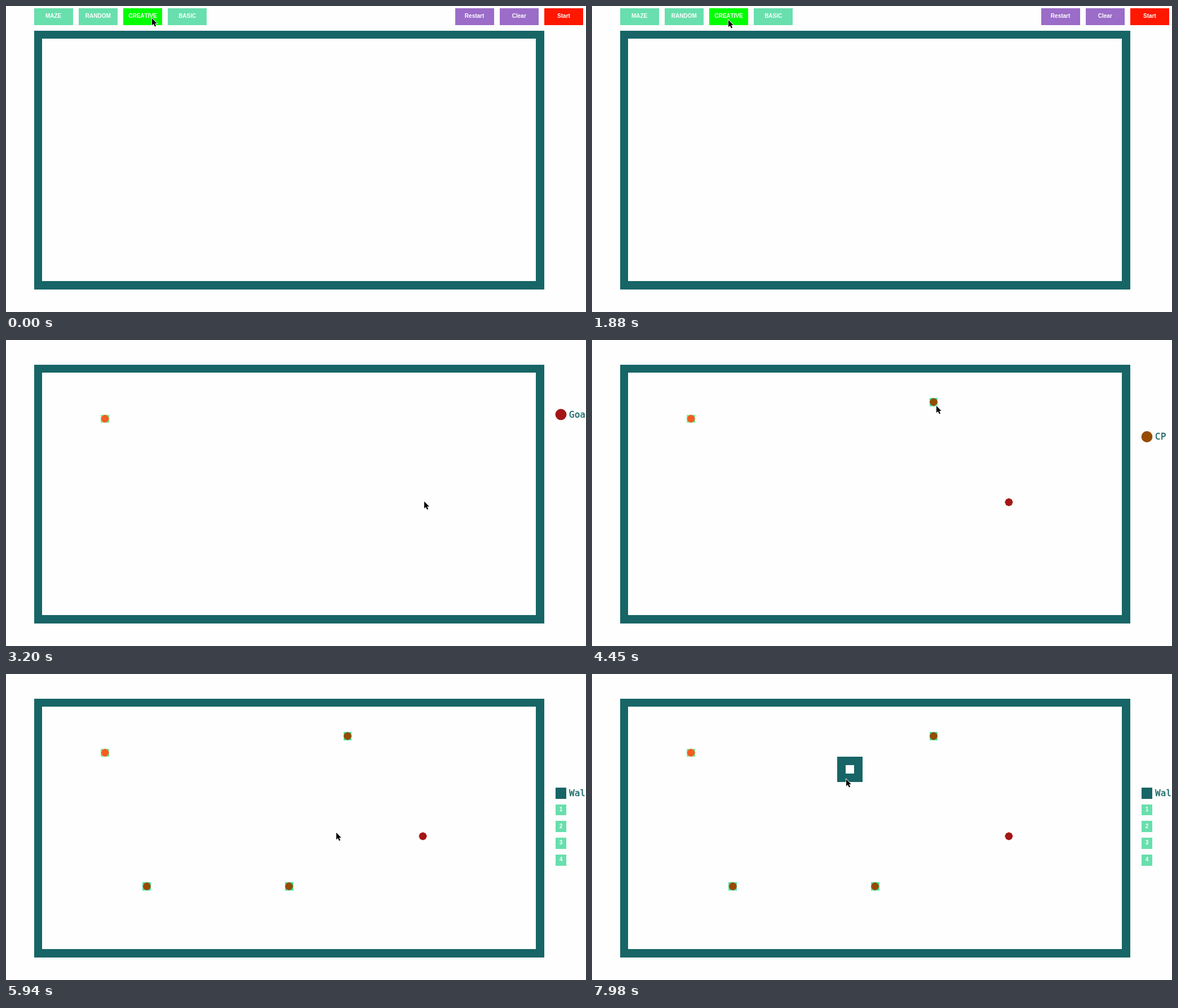
Write an HTML page that moves like this. It is 1029 px wide and 544 px high and loops after 8000 ms.

```html
<!DOCTYPE html>
<html lang="en">
<head>
<meta charset="utf-8">
<title>Grid editor</title>
<style>
  html, body { margin: 0; width: 100%; height: 100%; overflow: hidden; background: #fefefe; }
  svg { display: block; width: 1029px; height: 544px; }
  .label { font: bold 10px "Liberation Sans", Arial, sans-serif; font-kerning: none; fill: #fff; text-anchor: middle; }
  .legend { font: 16px "DejaVu Sans Mono", monospace; fill: #176566; stroke: #176566; stroke-width: .35; }
</style>
</head>
<body>
<svg id="stage" viewBox="0 0 1029 544"></svg>
<script>
const LOOP = 8000, CELL = 14.84, LEFT = 49.5, TOP = 43.5;
const TEAL = '#176566', MINT = '#68dfad', PURPLE = '#9b6cc8';
const ORANGE = '#f55d22', RED = '#a51515', BROWN = '#964b00';
const stage = document.getElementById('stage');

function add(parent, tag, attrs, text) {
  const node = document.createElementNS('http://www.w3.org/2000/svg', tag);
  for (const key in attrs) node.setAttribute(key, attrs[key]);
  if (text) node.textContent = text;
  return parent.appendChild(node);
}
const rect = (parent, x, y, width, height, fill) =>
  add(parent, 'rect', { x, y, width, height, fill, 'shape-rendering': 'crispEdges' });

// A ring of wall cells, one cell thick.
const ring = (parent, col, row, cols, rows) => add(parent, 'rect', {
  x: LEFT + (col + 0.5) * CELL, y: TOP + (row + 0.5) * CELL,
  width: (cols - 1) * CELL, height: (rows - 1) * CELL,
  fill: 'none', stroke: TEAL, 'stroke-width': CELL, 'shape-rendering': 'crispEdges'
});

// Groups are shown only during [from, to).
const timed = [];
function during(from, to) {
  const node = add(stage, 'g', {});
  timed.push({ node, from, to });
  return node;
}

function button(parent, x, y, w, h, fill, text) {
  const box = rect(parent, x, y, w, h, fill);
  add(parent, 'text', { x: x + w / 2, y: y + h / 2 + 2.3, class: 'label' }, text);
  return box;
}

function legend(parent, y, text, fill) {
  if (fill === TEAL) rect(parent, 974.6, y - 9.9, 19.8, 19.8, fill);
  else add(parent, 'circle', { cx: 984.5, cy: y, r: 9.9, fill });
  add(parent, 'text', { x: 999, y: y + 5.4, class: 'legend' }, text);
}

function marker(from, col, row, fill, back) {
  const group = during(from, LOOP);
  const x = LEFT + col * CELL, y = TOP + row * CELL;
  if (back) rect(group, x, y, CELL, CELL, back);
  const points = Array.from({ length: 8 }, (_, i) => {
    const a = i * Math.PI / 4;
    return [x + CELL / 2 + 7.1 * Math.cos(a), y + CELL / 2 + 7.1 * Math.sin(a)];
  });
  add(group, 'polygon', { points: points.join(' '), fill });
}

rect(stage, 0, 0, 1029, 544, '#fefefe');
ring(stage, 0, 0, 61, 31);

const menu = during(0, 2120);
const topButton = (x, fill) => (text, i) => button(menu, x + i * 79.2, 4, 69.2, 29.7, fill, text);
const creative = ['MAZE', 'RANDOM', 'CREATIVE', 'BASIC'].map(topButton(49.5, MINT))[2];
['Restart', 'Clear'].forEach(topButton(796.5, PURPLE));
['Start'].forEach(topButton(954.9, '#ff1700'));

legend(during(2120, 2690), 93, 'Start', ORANGE);
legend(during(2690, 3560), 132.4, 'Goal', RED);
legend(during(3560, 5700), 172, 'CP', BROWN);
const tools = during(5700, LOOP);
legend(tools, 211.8, 'Wall', TEAL);
const sizes = [1, 2, 3, 4].map(n =>
  button(tools, 974.6, 201.9 + n * 29.7, 19.8, 19.8, MINT, String(n)));

marker(2690, 8, 6, ORANGE, '#80f0a0');
marker(3560, 46, 16, RED);
marker(4450, 37, 4, BROWN, '#58e0a8');
marker(5110, 13, 22, BROWN, '#58e0a8');
marker(5700, 30, 22, BROWN, '#58e0a8');
ring(during(7860, LOOP), 26, 7, 3, 3);

const cursor = add(stage, 'path', {
  d: 'M0 0V12.4L2.8 9.8L5 14.6L7.2 13.6L5 8.9H8.8Z',
  fill: '#000', stroke: '#fff', 'stroke-width': 1.6, 'paint-order': 'stroke'
});

// Each trip of the pointer leads on from the one before it.
const trips = [];
let here = [259, 22];
function move(start, end, ...stops) {
  const steps = Math.round((end - start) / 57) + 1;
  trips.push({ start, end, steps, points: [here, ...stops] });
  here = stops[stops.length - 1];
}
move(0, 0, here);
move(360, 700, [205, 126]);
move(1420, 1880, [242, 25]);
move(2120, 2510, [176, 143]);
move(2690, 3200, [742, 287]);
move(3560, 4210, [650, 185], [606, 118]);
move(4450, 4450, [611, 117]);
move(4510, 5050, [250, 375]);
move(5170, 5230, [275, 376]);
move(5290, 5600, [502, 376]);
move(5760, 5940, [586, 282]);
move(6000, 6050, [628, 261]);
move(6100, 6890, [765, 212], [890, 188], [1018, 215], [988, 261]);
move(6940, 7050, [986, 269]);
move(7350, 7350, [900, 261]);
move(7410, 7800, [457, 170]);
move(7920, 7980, [451, 187]);

// Catmull-Rom curve through the points, u from 0 to 1.
function along(points, u) {
  const last = points.length - 1;
  const i = Math.min(Math.floor(u * last), last - 1), f = u * last - i;
  const at = k => points[Math.max(0, Math.min(last, k))];
  return [0, 1].map(axis => {
    const [a, b, c, d] = [-1, 0, 1, 2].map(k => at(i + k)[axis]);
    return b + f / 2 * (c - a + f * (2 * a - 5 * b + 4 * c - d + f * (3 * (b - c) + d - a)));
  });
}

function pointer(t) {
  const { start, end, steps, points } = trips.filter(trip => trip.start <= t).pop();
  const done = t >= end ? 1 : (t - start) / (end - start);
  const u = (Math.floor(done * (steps - 1) + 1e-6) + 1) / steps;
  return along(points, points.length > 2 ? u : u * u * (3 - 2 * u));
}

function render(t) {
  const [x, y] = pointer(t);
  cursor.setAttribute('transform', `translate(${x} ${y})`);
  const over = x >= 208 && x <= 277 && y <= 34;
  creative.setAttribute('fill', over ? '#00ff00' : MINT);
  sizes[1].setAttribute('fill', t >= 6940 && t < 7400 ? '#00c800' : MINT);
  for (const { node, from, to } of timed)
    node.setAttribute('visibility', t >= from && t < to ? 'visible' : 'hidden');
}

const begin = performance.now();
function tick() {
  render(Math.max(0, performance.now() - begin) % LOOP);
  requestAnimationFrame(tick);
}
render(0);
requestAnimationFrame(tick);
</script>
</body>
</html>
```
